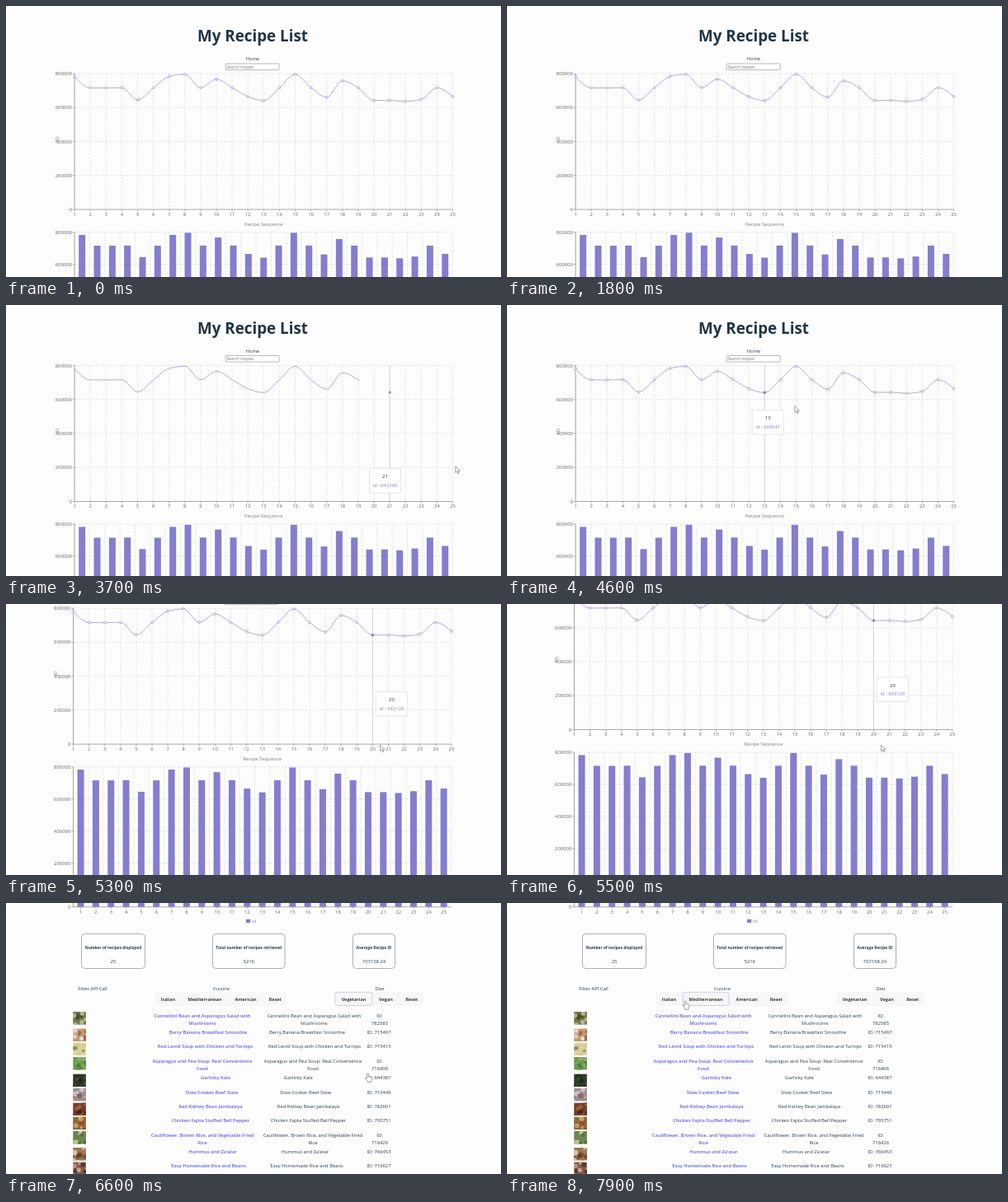
Recreate the animation shown at these times as an HTML page with a canvas. Size 600 by 329 pixels, loop 8000 ms.

```html
<!DOCTYPE html>
<html lang="en">
<head>
<meta charset="utf-8">
<title>My Recipe List</title>
<style>
html, body { margin: 0; width: 100%; height: 100%; overflow: hidden; background: #fdfdfd; }
canvas { display: block; }
</style>
</head>
<body>
<canvas id="stage" width="600" height="329"></canvas>
<script>
const ctx = document.getElementById('stage').getContext('2d');
const LOOP = 8000;
const PURPLE = '#857dce', INK = '#2b3d4c', GRAY = '#666', LINK = '#625ee9', PAGE = '#fdfdfd';
const ids = [782585, 715497, 715415, 716406, 644387, 715446, 782601, 795751, 716426, 766453,
  716627, 664000, 640941, 716300, 795500, 716400, 660800, 757000, 716200, 642129,
  642300, 636800, 648000, 716000, 664500];

// Page layout, in unscrolled coordinates
const left = 81.5, width = 458.4;
const line = { top: 82, bottom: 247 }, bar = { top: 274.5, bottom: 430.5 };
const step = width / 24, band = width / 25;
const pointX = i => left + i * step;
const valueY = (plot, v) => plot.bottom - (plot.bottom - plot.top) * v / 800000;

// Name, row y, link centre, name centre, photo tones
const recipes = [
  ['Cannellini Bean and Asparagus Salad with|Mushrooms', 562.2, 238, 373.5, '#75794a #d3d0b8 #3d4b27'],
  ['Berry Banana Breakfast Smoothie', 582.7, 245, 365, '#c09a72 #efe6dc #8c4a3a'],
  ['Red Lentil Soup with Chicken and Turnips', 599.7, 241.5, 374, '#d9d3b4 #e3c766 #7d8c58'],
  ['Asparagus and Pea Soup: Real Convenience|Food', 617.2, 238, 372, '#6d9a52 #93b574 #4b7035'],
  ['Garlicky Kale', 637.7, 254, 354.5, '#2c3a26 #4c5d3d #17201a'],
  ['Slow Cooker Beef Stew', 655.2, 249.5, 363, '#9a8f94 #dcdbe0 #8d5544'],
  ['Red Kidney Bean Jambalaya', 672.7, 248, 366.5, '#6e3f2b #b0683c #391d18'],
  ['Chicken Fajita Stuffed Bell Pepper', 689.7, 248, 366.5, '#8a6a38 #d8bd82 #9c3f2b'],
  ['Cauliflower, Brown Rice, and Vegetable Fried|Rice', 707.2, 238, 372, '#6f8450 #d9d6bd #3b5a2d'],
  ["Hummus and Za'atar", 727.2, 250.5, 362.5, '#a07650 #ece0cf #5b3a29'],
  ['Easy Homemade Rice and Beans', 744.7, 245.5, 364.5, '#855a46 #d0b39c #3f2a24']
];
const cards = [
  [91.5, 77, 'Number of recipes displayed', '25'],
  [250.5, 87.5, 'Total number of recipes retrieved', '5216'],
  [420.5, 51, 'Average Recipe ID', '707158.24']
];
const buttons = [
  ['Italian', 181, 31], ['Mediterranean', 213, 56], ['American', 270, 41], ['Reset', 312, 28.5],
  ['Vegetarian', 399, 45], ['Vegan', 445, 31], ['Reset', 477.5, 28.5]
];

// Rows of [time, ...values], interpolated linearly
const scrollKeys = [[3200, 0], [3500, 8.5], [4950, 8.5], [5150, 50], [5400, 94.5],
  [5950, 94.5], [6200, 242], [6400, 345], [6580, 425.7]];
const pointerKeys = [[2300, 34, -14], [2750, 26, 112], [3050, 26, 112], [3350, 170, 185],
  [3700, 545, 196], [3950, 490, 180], [4300, 200, 130], [4600, 348.5, 122.5], [4900, 453.5, 171],
  [5700, 453.5, 171], [5900, 438, 207], [6700, 438, 207], [7350, 232, 126], [7700, 215.5, 119]];

function track(keys, t) {
  const n = keys.findIndex(k => k[0] > t);
  if (n === 0) return keys[0].slice(1);
  if (n < 0) return keys[keys.length - 1].slice(1);
  const a = keys[n - 1], b = keys[n], p = (t - a[0]) / (b[0] - a[0]);
  return a.slice(1).map((v, i) => v + (b[i + 1] - v) * p);
}
const clamp = (v, lo = 0, hi = 1) => Math.min(hi, Math.max(lo, v));
const ease = p => 1 - (1 - clamp(p)) ** 2.4;

function text(str, x, y, size = 5.9, color = GRAY, weight = 400, align = 'center') {
  ctx.font = `${weight} ${size}px "Open Sans", "Noto Sans", sans-serif`;
  ctx.fillStyle = color;
  ctx.textAlign = align;
  ctx.fillText(str, x, y + size * 0.36);
}
function stroke(color, w, ...points) {
  ctx.strokeStyle = color;
  ctx.lineWidth = w;
  ctx.beginPath();
  points.forEach(([x, y]) => ctx.lineTo(x, y));
  ctx.stroke();
}
function box(x, y, w, h, r, fill, border, lw = 0.7) {
  ctx.beginPath();
  ctx.roundRect(x, y, w, h, r);
  if (fill) { ctx.fillStyle = fill; ctx.fill(); }
  if (border) { ctx.strokeStyle = border; ctx.lineWidth = lw; ctx.stroke(); }
}
function disc(x, y, r, fill, border) {
  ctx.beginPath();
  ctx.arc(x, y, r, 0, Math.PI * 2);
  ctx.fillStyle = fill;
  ctx.fill();
  if (border) { ctx.strokeStyle = border; ctx.lineWidth = 0.7; ctx.stroke(); }
}

// Monotone cubic through all values
const curve = (() => {
  const ys = ids.map(v => valueY(line, v));
  const slopes = ys.slice(1).map((y, i) => (y - ys[i]) / step);
  const tangent = ys.map((_, i) => {
    if (i === 0 || i === 24) return null;
    const a = slopes[i - 1], b = slopes[i];
    return (Math.sign(a) + Math.sign(b)) * Math.min(Math.abs(a), Math.abs(b), Math.abs(a + b) / 4);
  });
  tangent[0] = (3 * slopes[0] - tangent[1]) / 2;
  tangent[24] = (3 * slopes[23] - tangent[23]) / 2;
  const pts = [];
  for (let k = 0; k <= 24 * 16; k++) {
    const i = Math.min(23, k >> 4), u = k / 16 - i, v = 1 - u;
    const c1 = ys[i] + tangent[i] * step / 3, c2 = ys[i + 1] - tangent[i + 1] * step / 3;
    pts.push([pointX(i + u), v ** 3 * ys[i] + 3 * v * v * u * c1 + 3 * v * u * u * c2 + u ** 3 * ys[i + 1]]);
  }
  return pts;
})();
const curveLength = curve.reduce((sum, p, i) =>
  i ? sum + Math.hypot(p[0] - curve[i - 1][0], p[1] - curve[i - 1][1]) : 0, 0);

function grid(plot, columns) {
  ctx.setLineDash([2.4, 1.8]);
  for (let i = 0; i <= columns; i++) {
    const x = left + i * width / columns;
    stroke('#d2d2d2', 0.6, [x, plot.top], [x, plot.bottom]);
  }
  for (let v = 2e5; v <= 8e5; v += 2e5) {
    const y = valueY(plot, v);
    stroke('#d2d2d2', 0.6, [left, y], [left + width, y]);
  }
  ctx.setLineDash([]);
}
function axes(plot, tickX) {
  stroke('#888', 0.7, [left, plot.top], [left, plot.bottom], [left + width, plot.bottom]);
  for (let v = 0; v <= 8e5; v += 2e5) {
    const y = valueY(plot, v);
    stroke('#888', 0.6, [left - 2.4, y], [left, y]);
    text(v, left - 3.2, y, 5.9, GRAY, 400, 'right');
  }
  ids.forEach((_, i) => {
    stroke('#888', 0.6, [tickX(i), plot.bottom], [tickX(i), plot.bottom + 2.4]);
    text(i + 1, tickX(i), plot.bottom + 5.7);
  });
}
function tooltip(x, y, i) {
  box(x, y, 38, 29.5, 0, 'rgba(255,255,255,.97)', '#d6d6d6', 0.6);
  text(i + 1, x + 19, y + 9.5, 5.9, '#333');
  text('id : ' + ids[i], x + 19, y + 20.3, 5.9, PURPLE);
}

const shiftAt = t => t < 4950 ? 1.6 : 0;

function nearest(t) {
  return clamp(Math.round((track(pointerKeys, t)[0] - left - shiftAt(t)) / step), 0, 24);
}

function lineChart(t) {
  grid(line, 24);
  axes(line, pointX);
  text('Recipe Sequence', left + width / 2, 264.5, 5.9, '#808080');
  ctx.save();
  ctx.translate(60, 161.5);
  ctx.rotate(-Math.PI / 2);
  text('ID', 0, 0, 5.9, '#808080');
  ctx.restore();

  const drawn = t < 1900 ? 1 : ease((t - 3020) / 1500);
  const hovered = t > 3300 && t < 5740;
  const held = Math.min(t, 4949);
  const settle = t - 75;
  const active = nearest(Math.min(settle, 4949));
  if (hovered) stroke('#ccc', 0.7, [pointX(active), line.top], [pointX(active), line.bottom]);
  if (drawn > 0) {
    if (drawn < 1) ctx.setLineDash([curveLength * drawn, curveLength * 2]);
    stroke('#918bd6', 0.75, ...curve);
    ctx.setLineDash([]);
    if (drawn === 1) ids.forEach((v, i) => disc(pointX(i), valueY(line, v), 1.35, '#fff', '#8e88d5'));
  }
  if (hovered) {
    disc(pointX(active), valueY(line, ids[active]), 1.5, PURPLE);
    let x = 0;
    for (let k = 0; k < 4; k++) x += pointX(nearest(Math.min(settle - k * 20, 4949))) / 4;
    const y = track(pointerKeys, t - 40)[1] + track(scrollKeys, held)[0] + 4;
    tooltip(x > left + width - 42 ? x - 42 : x + 4, y, active);
  }
}

function barChart(t) {
  const center = i => left + (i + 0.5) * band;
  const hovered = t > 5780 && t < 6350;
  grid(bar, 25);
  if (hovered) {
    ctx.fillStyle = '#cbcbcb';
    ctx.fillRect(left + 19 * band, bar.top, band, bar.bottom - bar.top);
  }
  const grown = t < 1900 ? 1 : ease((t - 2400) / 400);
  ctx.fillStyle = PURPLE;
  ids.forEach((v, i) => {
    const y = valueY(bar, v * grown);
    ctx.fillRect(center(i) - 4.1, y, 8, bar.bottom - y);
  });
  axes(bar, center);
  ctx.fillStyle = PURPLE;
  ctx.fillRect(291, 445.4, 5.2, 4.4);
  text('id', 298, 447.2, 5.9, PURPLE, 400, 'left');
  if (hovered) tooltip(431, 305.3, 19);
}

function header() {
  text('My Recipe List', 297.4, 36.3, 18.8, '#213547', 700);
  text('Home', 297.3, 64, 5.8, INK, 500);
  box(264.6, 70, 65, 7.6, 1, '#fff', '#8a8a8a', 0.6);
  text('Search recipes', 265.8, 73.9, 4.9, '#757575', 400, 'left');
}

// A plate of food suggested by a few seeded patches
function thumbnail(y, colors, seed) {
  const tones = colors.split(' ');
  const random = n => Math.abs(Math.sin(seed * 12.9 + n * 78.2) * 437.5) % 1;
  ctx.save();
  ctx.beginPath();
  ctx.rect(81.3, y, 15.6, 15.5);
  ctx.clip();
  ctx.fillStyle = tones[0];
  ctx.fillRect(81, y, 16, 16);
  ctx.globalAlpha = 0.7;
  for (let k = 0; k < 14; k++) {
    disc(81 + 16 * random(k), y + 16 * random(k + 20), 1.3 + 2 * random(k + 40), tones[k % 3]);
  }
  ctx.restore();
}

function details(hover) {
  cards.forEach(([x, w, label, value]) => {
    box(x, 463.2, w, 42, 4, '#fefefe', '#8f8f8f');
    text(label, x + w / 2, 480, 4.8, INK, 700);
    text(value, x + w / 2, 496.8, 5.85, INK);
  });
  text('Filter API Call', 105, 529.2, 5.85, INK);
  text('Cuisine', 261, 529.2, 5.85, INK);
  text('Diet', 453, 529.2, 5.85, INK);
  box(180.5, 534, 160.5, 16.4, 3, '#f7f7f7');
  box(399, 534, 107, 16.4, 3, '#f7f7f7');
  buttons.forEach(([label, x, w], i) => {
    if (i === hover) box(x, 534, w, 16.2, 3, '#f6f6f8', '#b4b6e2', 0.6);
    text(label, x + w / 2, 542.2, 5.7, '#1c1c1c', 600);
  });
  recipes.forEach(([name, y, linkX, nameX, colors], i) => {
    const rows = name.split('|');
    thumbnail(y - 4.6, colors, i + 1);
    rows.forEach((row, n) => {
      text(row, linkX, y + n * 9.4, 5.8, LINK, 600);
      text(row, nameX, y + n * 9.4, 5.85, INK);
    });
    if (rows.length > 1) {
      text('ID:', 453, y, 5.85, INK);
      text(ids[i], 453, y + 9.4, 5.85, INK);
    } else {
      text('ID: ' + ids[i], 452, y, 5.85, INK);
    }
  });
}

function pointer(x, y, hand) {
  ctx.save();
  ctx.translate(x, y);
  ctx.lineJoin = 'round';
  const shape = new Path2D(hand
    ? 'M0 0Q1.2-.6 1.5.8V3.6L4.6 4.3Q5.5 4.6 5.4 5.8L4.7 8.6V10.3H.3V9L-2.4 5.8Q-2.4 4.6-1.2 5L-.4 5.8V.8Z'
    : 'M0 0V7.6L1.8 6L3 8.8L4.3 8.2L3.1 5.5H5.5Z');
  ctx.fillStyle = '#fff';
  ctx.fill(shape);
  ctx.strokeStyle = '#666';
  ctx.lineWidth = 0.6;
  ctx.stroke(shape);
  ctx.restore();
}

function hoveredButton(t, x, y) {
  if (t > 6400 && t < 6720) return 4;
  if (t < 6720) return -1;
  return buttons.findIndex(([, bx, w]) => x >= bx && x <= bx + w && y > 108 && y < 125);
}

function draw(t) {
  const [scroll] = track(scrollKeys, t), [x, y] = track(pointerKeys, t);
  const hover = hoveredButton(t, x, y);
  ctx.fillStyle = PAGE;
  ctx.fillRect(0, 0, 600, 329);
  ctx.save();
  ctx.translate(shiftAt(t), -scroll);
  header();
  if (t < 1900 || t >= 2400) {
    barChart(t);
    lineChart(t);
    details(hover);
  }
  ctx.restore();
  if (t > 2300) pointer(x, y, hover >= 0);
}

function tick(now) {
  draw(now % LOOP);
  requestAnimationFrame(tick);
}
draw(0);
requestAnimationFrame(tick);
</script>
</body>
</html>
```
